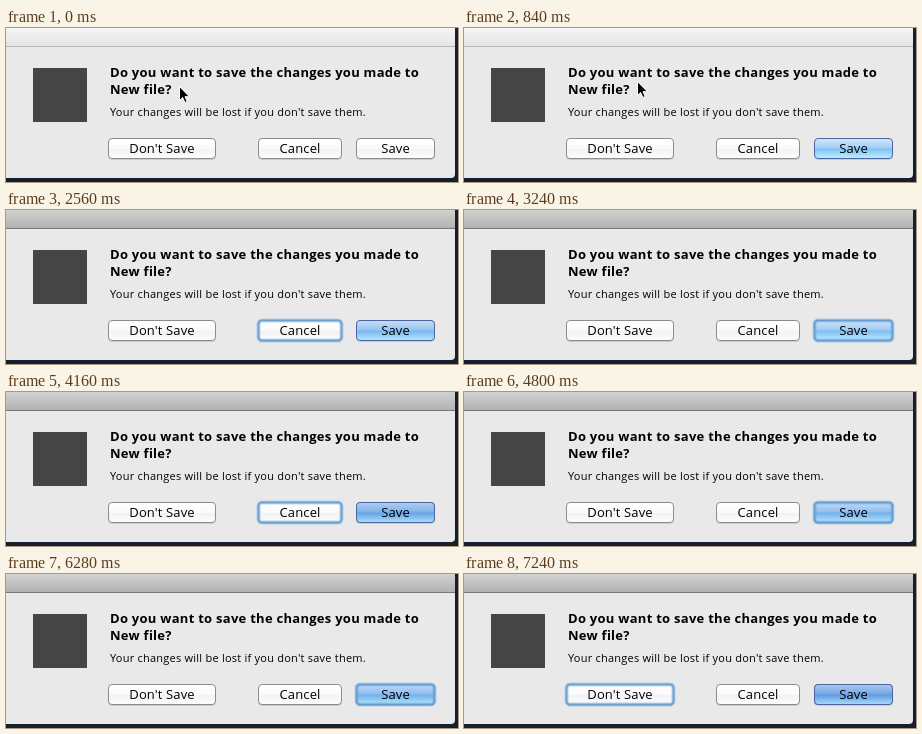
An HTML page that plays this animation: 452 px wide and 154 px high, repeating every 7.28 s.

```html
<!DOCTYPE html>
<html lang="en">
<head>
<meta charset="utf-8">
<title>Save dialog</title>
<style>
  html, body { margin: 0; width: 100%; height: 100%; overflow: hidden; background: #14202d; }
  svg { display: block; width: 452px; height: 154px; }
  text { font-family: "Open Sans", "Noto Sans", sans-serif; fill: #000; }
  .head { font-size: 13px; font-weight: 700; letter-spacing: .27px; }
  .note { font-size: 11px; font-weight: 500; letter-spacing: .23px; }
  .label { font-size: 13px; font-weight: 500; letter-spacing: .12px; text-anchor: middle; }
</style>
</head>
<body>
<svg viewBox="0 0 452 154" xmlns="http://www.w3.org/2000/svg">
  <defs>
    <linearGradient id="idle" x2="0" y2="1">
      <stop stop-color="#f5f5f5"/><stop offset="1" stop-color="#e4e4e4"/>
    </linearGradient>
    <linearGradient id="active" x2="0" y2="1">
      <stop stop-color="#d2d2d2"/><stop offset="1" stop-color="#b2b2b2"/>
    </linearGradient>
    <linearGradient id="plain" x2="0" y2="1">
      <stop stop-color="#fff"/><stop offset=".5" stop-color="#fafafa"/>
      <stop offset=".52" stop-color="#f2f2f2"/><stop offset="1" stop-color="#fdfdfd"/>
    </linearGradient>
    <linearGradient id="pale" x2="0" y2="1">
      <stop stop-color="#d5e7fb"/><stop offset=".48" stop-color="#a2cef7"/>
      <stop offset=".52" stop-color="#82c0f5"/><stop offset="1" stop-color="#bcf0ff"/>
    </linearGradient>
    <linearGradient id="deep" x2="0" y2="1">
      <stop stop-color="#abc8ee"/><stop offset=".48" stop-color="#76a8e5"/>
      <stop offset=".52" stop-color="#5f9ae0"/><stop offset="1" stop-color="#a6dcfc"/>
    </linearGradient>
  </defs>

  <rect width="452" height="154" fill="#14202d"/>
  <rect x="-6" y="-8" width="455" height="158" rx="4" fill="#e9e9e9"/>
  <rect id="bar" width="449" height="18"/>
  <rect id="rule" y="18" width="449" height="1"/>

  <rect x="27" y="40" width="54" height="54" fill="#454545"/>

  <text class="head" x="104" y="49">Do you want to save the changes you made to</text>
  <text class="head" x="104" y="66">New file?</text>
  <text class="note" x="104" y="88">Your changes will be lost if you don't save them.</text>

  <g id="buttons"></g>

  <path id="cursor" d="M0 0V14L3.2 11L5.4 16L7.7 15L5.5 10.2H9.9Z"
    fill="#000" stroke="#fff" stroke-width="1" stroke-linejoin="round"/>
</svg>
<script>
const LOOP = 7280, STEP = 40;
const PULSE_ON = 840, ACTIVE = 1000, CURSOR_OFF = 1400;
const PULSE = 735, PULSE_START = 963;
// Each Tab press moves the focus to the next button.
const TABS = [1840, 2440, 2960, 3470, 4060, 4560, 5040, 5480, 6100, 6720];

const $ = id => document.getElementById(id);

function add(parent, tag, attrs) {
  const el = document.createElementNS("http://www.w3.org/2000/svg", tag);
  for (const key in attrs) el.setAttribute(key, attrs[key]);
  return parent.appendChild(el);
}

function makeButton(label, x, width) {
  const box = { x: x + .5, y: 110.5, width: width - 1, height: 20, rx: 3.5 };
  const g = add($("buttons"), "g", {});
  add(g, "rect", { ...box, y: 111.5, fill: "none", stroke: "#000", "stroke-opacity": .13 });
  const face = add(g, "rect", { ...box, fill: "url(#plain)" });
  const tint = add(g, "rect", { ...box, fill: "url(#deep)", opacity: 0 });
  const ring = add(g, "g", { fill: "none", stroke: "#6ba3d6" });
  add(ring, "rect", { ...box, "stroke-width": 4, "stroke-opacity": .45 });
  add(ring, "rect", { ...box, "stroke-width": 2, "stroke-opacity": .8 });
  add(g, "text", { class: "label", x: x + width / 2, y: 125 }).textContent = label;
  return { ring, face, tint };
}

const buttons = [
  makeButton("Don't Save", 102, 108),
  makeButton("Cancel", 252, 84),
  makeButton("Save", 350, 79)
];

function draw(time) {
  const t = Math.floor(time / STEP) * STEP;
  const active = t >= ACTIVE, blue = t >= PULSE_ON;

  $("bar").setAttribute("fill", active ? "url(#active)" : "url(#idle)");
  $("rule").setAttribute("fill", active ? "#777" : "#b4b4b4");

  const presses = TABS.filter(tab => t >= tab).length;
  const focus = presses ? (presses - 1) % 3 : -1;
  buttons.forEach(({ ring, face, tint }, i) => {
    const edge = i === 2 && blue ? "#4d66a0" : "#8c8c8c";
    ring.setAttribute("visibility", i === focus ? "visible" : "hidden");
    face.setAttribute("stroke", edge);
    tint.setAttribute("stroke", edge);
  });

  const save = buttons[2];
  const depth = active ? (1 - Math.cos((t - PULSE_START) / PULSE * 2 * Math.PI)) / 2 : 0;
  save.face.setAttribute("fill", blue ? "url(#pale)" : "url(#plain)");
  save.tint.setAttribute("opacity", depth);

  const rise = 5 * Math.min(t / 360, 1);
  $("cursor").setAttribute("transform", `translate(173.5 ${58.5 - rise})`);
  $("cursor").setAttribute("visibility", t < CURSOR_OFF ? "visible" : "hidden");
}

const start = performance.now();
function tick() {
  draw((performance.now() - start) % LOOP);
  requestAnimationFrame(tick);
}
tick();
</script>
</body>
</html>
```
